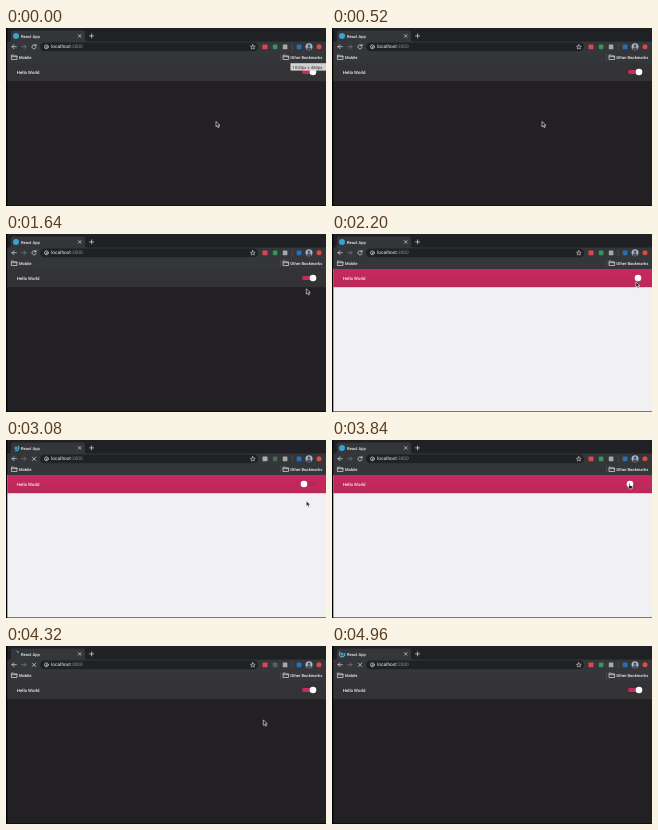
An HTML page for the animation above (5 s loop, 320x178 px).

```html
<!DOCTYPE html>
<html lang="en">
<head>
<meta charset="utf-8">
<title>Theme switch</title>
<style>
  html, body { margin: 0; width: 100%; height: 100%; overflow: hidden; background: #000; }
  svg { display: block; width: 100%; height: 100%; }
  text { font: 500 4.1px Roboto, sans-serif; fill: #f1f1f2; text-rendering: geometricPrecision; }
  .line { fill: none; stroke: #d5d6d9; stroke-width: .75; stroke-linecap: round; stroke-linejoin: round; }
  .dim { stroke: #77787c; }
</style>
</head>
<body>
<svg viewBox="0 0 320 178">
  <defs>
    <linearGradient id="pink" x2="0" y2="1">
      <stop stop-color="#c9285f"/><stop offset="1" stop-color="#b92859"/>
    </linearGradient>
    <path id="folder" class="line" d="M0 .6h2l.7.8h2.5v3.6H0zM0 2.2h5.2"/>
  </defs>

  <!-- browser chrome -->
  <rect x="1.3" width="319" height="36" fill="#202124"/>
  <path d="M3 13.5q2 0 2-2V4.5q0-2 2-2h70q2 0 2 2v7q0 2 2 2H320V35H1.3V13.5z" fill="#35363a"/>
  <circle id="icon" cx="10" cy="8" r="3" fill="#3e9fd2"/>
  <circle id="spinner" cx="10" cy="8" r="2.8" fill="none" stroke="#58b9c6" stroke-width="1"/>
  <text x="15" y="9.5">React App</text>
  <path class="line" d="M72.4 6.6l2.6 2.6m0-2.6l-2.6 2.6M83.6 7.9h4m-2-2v4"/>
  <path class="line" d="M10.3 18.7H6m2-2l-2 2 2 2"/>
  <path class="line dim" d="M15.7 18.7H20m-2-2l2 2-2 2"/>
  <path id="reload" class="line"/>
  <rect x="34" y="14.6" width="218" height="8.6" rx="4.3" fill="#202124"/>
  <circle class="line" cx="40.4" cy="18.8" r="1.9"/>
  <path class="line" d="M40.4 18.7v1"/>
  <text x="45.2" y="20.4" style="font-size:4.8px;font-weight:400">localhost<tspan fill="#8b8c90">:3000</tspan></text>
  <path class="line" style="stroke-width:.6" d="M246.8 16.6l.7 1.6 1.7.1-1.3 1.1.4 1.7-1.5-.9-1.5.9.4-1.7-1.3-1.1 1.7-.1z"/>

  <!-- extensions, profile, menu -->
  <rect id="ext1" x="256.5" y="16.4" width="5" height="4.8" rx=".8"/>
  <rect id="ext2" x="266.8" y="16.4" width="4.6" height="4.8" rx="1.2"/>
  <rect x="276.8" y="16.5" width="4.6" height="4.8" rx=".6" fill="#a5aaa9"/>
  <path d="M286.3 15.5v6.5" stroke="#56575b" stroke-width=".6"/>
  <rect x="290.7" y="16.4" width="4.8" height="4.8" rx=".7" fill="#256fbb"/>
  <circle cx="303" cy="18.8" r="3.5" fill="#a9b8cd"/>
  <path d="M300.2 21.2q.4-1.9 2.8-1.9t2.8 1.9a3.5 3.5 0 0 1-5.6 0z" fill="#4c5161"/>
  <circle cx="303" cy="17.8" r="1.4" fill="#4c5161"/>
  <circle cx="313" cy="18.8" r="2.5" fill="#d94b49"/>

  <use href="#folder" x="5.8" y="26.5"/>
  <text x="13" y="30.9">Mobile</text>
  <path d="M274.5 25.8v7" stroke="#56575b" stroke-width=".5"/>
  <use href="#folder" x="277.4" y="26.5"/>
  <text x="284.3" y="30.9">Other Bookmarks</text>

  <!-- page -->
  <rect id="page" x="1.3" y="35" width="319" height="142.5"/>
  <rect id="bar" x="1.3" y="35" width="319" height="18.2"/>
  <text x="10.8" y="45.8" style="font-size:4.4px">Hello World</text>
  <rect id="track" x="296" y="42.1" width="13" height="3.8" rx="1.9"/>
  <circle id="knob" cy="44" r="3.3" fill="#fff"/>

  <g id="size">
    <rect x="284.5" y="35.2" width="36" height="7.4" fill="#d3d3d4"/>
    <text x="286.3" y="40.6" style="font-size:4.3px;font-weight:400;fill:#333">1020px x 484px</text>
  </g>

  <path id="pointer" fill="#111" stroke="#fff" stroke-width=".6" stroke-linejoin="round"/>
</svg>

<script>
const $ = id => document.getElementById(id);
const set = (id, attrs) => {
  for (const key in attrs) $(id).setAttribute(key, attrs[key]);
};
const show = (id, on) => set(id, { visibility: on ? 'visible' : 'hidden' });
const smooth = x => { x = Math.min(1, Math.max(0, x)); return x * x * (3 - 2 * x); };

const LOOP = 5000, LIGHT_ON = 2170, LIGHT_OFF = 3880;
const loads = [[120, 480], [920, 1360], [2400, 2760], [2960, 3320], [4280, 4640], [4760, 5000]];
// time, x, y of the pointer tip
const route = [
  [0, 210, 93.5], [640, 210, 93.5], [1040, 219, 91.5], [1280, 224, 96],
  [1640, 300.3, 54.8], [1920, 304, 47.8], [2260, 303.8, 48], [2560, 301, 61],
  [3400, 300, 61], [3680, 296.3, 43], [3920, 296.3, 43], [4320, 257.3, 74],
  [4540, 256, 76], [4860, -4, 166]
];
const ARROW = 'M0 0v5.3l1.3-1.1.9 2 1-.5-.9-1.9h1.7z';
const HAND = 'M.6.4q.6-.6 1 .1v1.9l2 .5q.7.3.5 1L3.7 6H1.5L-.1 3.9q0-.6.7-.5z';
const STOP = 'M26.4 17.1l3.4 3.4m0-3.4l-3.4 3.4';
const RELOAD = 'M29.9 17.7a2.1 2.1 0 1 0 .2 1.8M30.1 16.3v1.6h-1.6';

function pointerAt(t) {
  const i = route.findIndex(p => p[0] > t);
  if (i < 0) return null;
  const [a, b] = [route[i - 1], route[i]];
  const k = smooth((t - a[0]) / (b[0] - a[0]));
  return [a[1] + (b[1] - a[1]) * k, a[2] + (b[2] - a[2]) * k];
}

function draw(t) {
  const light = t >= LIGHT_ON && t < LIGHT_OFF;
  const off = smooth((t - LIGHT_ON) / 150) - smooth((t - LIGHT_OFF) / 150);
  set('page', { fill: light ? '#f1f0f2' : '#222022' });
  set('bar', { fill: light ? 'url(#pink)' : '#333234' });
  set('track', { fill: light ? '#a82a55' : '#c62b5d', opacity: light ? off * .6 : 1 });
  set('knob', { cx: 307 - 9 * off });

  const load = loads.find(([from, to]) => t >= from && t < to);
  const age = load ? t - load[0] : 1e4;
  const arc = Math.min(13, age * .06);
  set('reload', { d: load ? STOP : RELOAD });
  set('icon', { r: !load ? 3 : age < 100 ? 0 : 1.6 });
  show('spinner', load);
  set('spinner', {
    'stroke-dasharray': `${arc} 20`,
    transform: `rotate(${age * .36 - 90} 10 8)`
  });
  set('ext1', { fill: age > 80 && age < 180 ? '#a9abae' : '#dc4652' });
  set('ext2', { fill: age > 20 && age < 180 ? '#4b6b4c' : '#2f9a59' });
  show('size', t < 320);

  const at = pointerAt(t);
  show('pointer', at);
  if (at) {
    const overKnob = Math.hypot(at[0] - 298, at[1] - 44) < 4;
    set('pointer', { transform: `translate(${at})`, d: overKnob ? HAND : ARROW });
  }
}

function frame() {
  draw(performance.now() % LOOP);
  requestAnimationFrame(frame);
}
frame();
</script>
</body>
</html>
```
